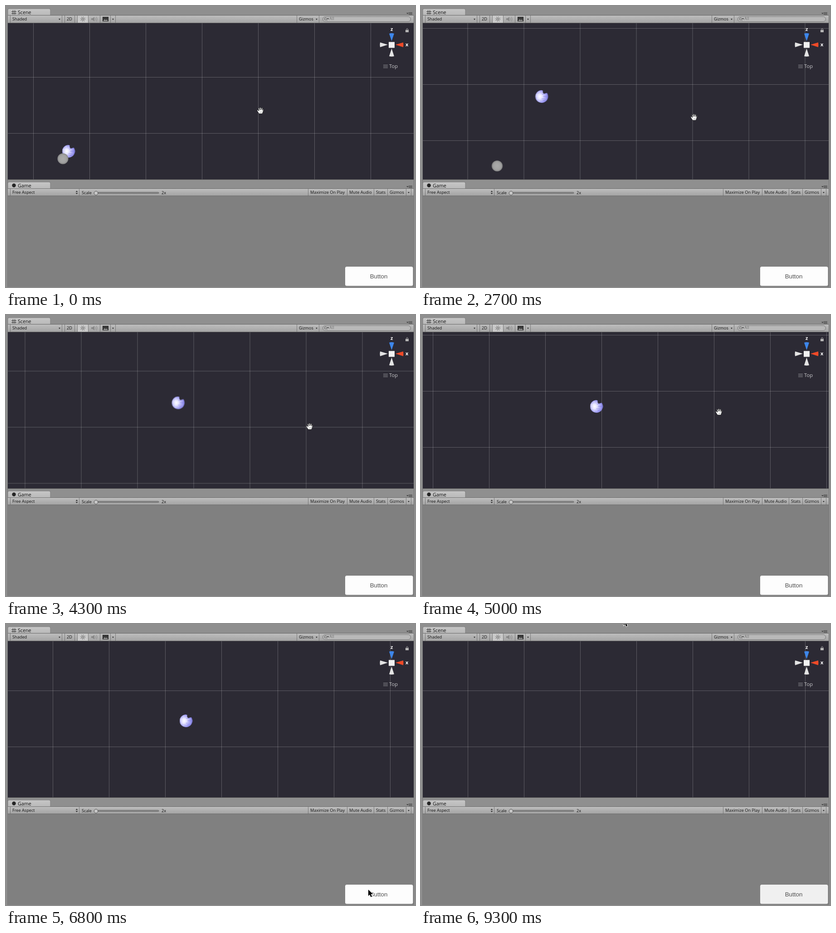
An HTML page for the animation above (9500 ms loop, 902x621 px).

```html
<!DOCTYPE html>
<html lang="en">
<head>
<meta charset="utf-8">
<title>Scene and game panels</title>
<style>
html, body { margin: 0; width: 100%; height: 100%; overflow: hidden; background: #8f8f8f; }
svg { display: block; width: 902px; height: 621px; }
text { font: 9.2px "Open Sans", "Noto Sans", sans-serif; fill: #111; }
.tab { font-size: 10.7px; }
.light { font-size: 11.2px; fill: #c8c8cb; }
.axis { font: bold 11px "Open Sans", sans-serif; fill: #fff; }
.label { font: 13.4px "Liberation Sans", Arial, sans-serif; fill: #505050; text-anchor: middle; }
.line { fill: none; stroke: #555; }

#pan, #ball, #hand, #arrow, #handShow, #arrowShow, .play, .idle, #ballShow, #face {
  animation: 9.5s step-end infinite;
}
#pan { animation-name: pan; }
#ball { animation-name: ball; }
#hand { animation-name: hand; }
#arrow { animation-name: arrow; }
#handShow { animation-name: handShow; }
#arrowShow { animation-name: arrowShow; }
#ballShow { animation-name: ballShow; }
#face { animation-name: face; }
.play { animation-name: play; }
.idle { animation-name: idle; }

/* Motion advances ten times a second. */
@keyframes pan {
  0% { transform: translate(0, 0); }
  10.526% { transform: translate(0, 0); animation-timing-function: steps(8); }
  18.947% { transform: translate(-36px, -14px); animation-timing-function: steps(18); }
  37.894% { transform: translate(121px, 46px); animation-timing-function: steps(14); }
  52.631% { transform: translate(90px, 135px); animation-timing-function: steps(11); }
  64.21%, 100% { transform: translate(43px, 238px); }
}
@keyframes ball {
  0% { transform: translate(136.5px, 321px); animation-timing-function: steps(18); }
  18.947% { transform: translate(194.5px, 228px); animation-timing-function: steps(18); }
  37.894% { transform: translate(250px, 140px); animation-timing-function: steps(14); }
  52.631% { transform: translate(295.5px, 67px); animation-timing-function: steps(18); }
  71.578% { transform: translate(352.5px, -24px); animation-timing-function: steps(10); }
  82.105% { transform: translate(386.5px, -79px); animation-timing-function: steps(2); }
  84.21% { transform: translate(391px, -86px); animation-timing-function: steps(3); }
  87.368%, 100% { transform: translate(401px, -102px); }
}
@keyframes hand {
  0% { transform: translate(561px, 231px); animation-timing-function: steps(10); }
  10.526% { transform: translate(558px, 227px); animation-timing-function: steps(8); }
  18.947% { transform: translate(522px, 213px); animation-timing-function: steps(18); }
  37.894% { transform: translate(682px, 278px); animation-timing-function: steps(14); }
  52.631% { transform: translate(657px, 214px); animation-timing-function: steps(11); }
  64.21%, 100% { transform: translate(610px, 317px); }
}
@keyframes arrow {
  0% { transform: translate(610px, 317px); }
  64.21% { transform: translate(610px, 317px); animation-timing-function: steps(6); }
  70.526% { transform: translate(799px, 587px); }
  91.578% { transform: translate(799px, 587px); animation-timing-function: steps(3); }
  94.736% { transform: translate(445px, 5px); }
  95.789% { transform: translate(445px, 5px); animation-timing-function: steps(2); }
  97.894%, 100% { transform: translate(447px, -11px); }
}
@keyframes handShow { 0% { opacity: 1; } 64.21%, 100% { opacity: 0; } }
@keyframes arrowShow { 0% { opacity: 0; } 64.21%, 100% { opacity: 1; } }
@keyframes ballShow { 0% { opacity: 1; } 93.684%, 100% { opacity: 0; } }
@keyframes play { 0% { opacity: 0; } 73.684% { opacity: 1; } 93.684%, 100% { opacity: 0; } }
@keyframes idle { 0% { opacity: 1; } 73.684% { opacity: 0; } 93.684%, 100% { opacity: 1; } }
@keyframes face { 0% { fill: #fdfdfd; } 74.736%, 100% { fill: #f0f0f0; } }
</style>
</head>
<body>
<svg viewBox="0 0 902 621">
  <defs>
    <linearGradient id="bar" x2="0" y2="1">
      <stop stop-color="#bdbdbd"/><stop offset="1" stop-color="#a4a4a4"/>
    </linearGradient>
    <linearGradient id="tab" x2="0" y2="1">
      <stop stop-color="#c6c6c6"/><stop offset="1" stop-color="#b9b9b9"/>
    </linearGradient>
    <radialGradient id="grey">
      <stop stop-color="#aaa"/><stop offset=".7" stop-color="#a2a2a2"/><stop offset="1" stop-color="#858585"/>
    </radialGradient>
    <radialGradient id="blue" cx=".36" cy=".5" r=".66">
      <stop stop-color="#fff"/><stop offset=".3" stop-color="#e2e1ff"/>
      <stop offset=".65" stop-color="#aaa8f6"/><stop offset="1" stop-color="#7c79e0"/>
    </radialGradient>
    <pattern id="grid" x="60" y="157" width="124" height="124" patternUnits="userSpaceOnUse">
      <path d="M.5 0V124M0 .5H124" stroke="#fff" stroke-opacity=".24"/>
    </pattern>
    <clipPath id="view"><rect x="4" y="38" width="895" height="345"/></clipPath>
    <g id="menu">
      <path d="M883 15h5l-2.5 3z" fill="#444"/>
      <path d="M888 14.5h8M888 16.5h8M888 18.5h8" stroke="#444"/>
    </g>
    <path id="drop" d="M0 0h4l-2 3z" fill="#333"/>
  </defs>

  <rect width="902" height="621" fill="#8f8f8f"/>
  <path d="M3.5 21V621M899.5 21V621" stroke="#777"/>

  <!-- Scene panel -->
  <path d="M4 21V9q0-3 3-3H95q3 0 3 3V21z" fill="url(#tab)" stroke="#808080"/>
  <path d="M12 12.5h11M12 16.5h11M15.5 9v10M19.5 9v10" stroke="#333"/>
  <text class="tab" x="26" y="18">Scene</text>
  <use href="#menu"/>
  <rect x="4" y="21" width="895" height="16" fill="url(#bar)"/>
  <path class="line" d="M4 20.5H899M4 37.5H899" stroke-opacity=".7"/>
  <path class="line" d="M9.5 21V37M123.5 21V37M129.5 21V37M151.5 21V37M157.5 21V37M181.5 21V37M207.5 21V37M230.5 21V37M241.5 21V37M641.5 21V37M690.5 21V37" stroke-opacity=".6"/>
  <rect x="158" y="21" width="23" height="16" fill="#c9c9c9"/>
  <text x="14" y="32">Shaded</text><use href="#drop" x="116" y="28"/>
  <text x="134" y="32">2D</text>
  <circle cx="169.5" cy="29" r="2.3" fill="none" stroke="#444"/>
  <circle cx="169.5" cy="29" r="4.8" fill="none" stroke="#555" stroke-width="1.3" stroke-dasharray="1.2 2.57"/>
  <path d="M188 27h3l4-3v10l-4-3h-3z" fill="#888"/>
  <path d="M197 26q2 3 0 6M199 24q4 5 0 10" fill="none" stroke="#888"/>
  <rect x="213.5" y="24.500" width="12" height="9" fill="#3a3a3a" stroke="#222"/>
  <path d="M214 33l3.500-3.500 2.500 2 2-1.500 3 3z" fill="#a0a0a0"/>
  <use href="#drop" x="234" y="28"/>
  <text x="646" y="32">Gizmos</text><use href="#drop" x="683" y="28"/>
  <rect x="698.5" y="23.5" width="194" height="11" rx="5.5" fill="#b9b9b9" stroke="#777"/>
  <circle cx="704.5" cy="28.5" r="2.5" fill="none" stroke="#555"/>
  <path d="M706.5 30.5l2 2" stroke="#555"/><use href="#drop" x="708" y="27"/>
  <text x="713" y="31" style="fill:#777">All</text>

  <rect x="4" y="38" width="895" height="345" fill="#2c2a34"/>
  <g clip-path="url(#view)">
    <g id="pan">
      <rect x="-250" y="-300" width="1300" height="800" fill="url(#grid)"/>
      <g id="ballShow"><g id="ball">
        <path d="M1-14A14 14 0 1 0 13-8L6-6 4-9 4-13z" fill="url(#blue)"/>
        <g class="idle" fill="none">
          <path d="M-12-4H12M-11 5H11M-4-12V12" stroke="#fff" stroke-opacity=".4"/>
          <path d="M2-5h9M5 0h8M1 5h9M4 9h5M-11 2v4" stroke="#7774dd" stroke-opacity=".65"/>
        </g>
        <g class="play" fill="none">
          <path d="M-8-9l3 6M-10 6l6-2M-3 12l1-7M5 10L2 4" stroke="#6662d6" stroke-opacity=".75" stroke-width="1.5"/>
          <path d="M4-6l9-1M4-1h10M3 4l9 2" stroke="#908cf2" stroke-width="2"/>
          <path d="M8-3.500h6M8 1.500h6" stroke="#3b3868" stroke-width="1.500"/>
        </g>
      </g></g>
      <circle cx="125.5" cy="337.5" r="12" fill="url(#grey)"/>
    </g>
    <!-- Axis gizmo -->
    <path d="M845 61q5.500-2 11 0l-5.500 16.500z" fill="#3d86ea"/>
    <path d="M876 80.500q1 5.500 0 10.500l-17-5.500z" fill="#ee4a28"/>
    <path d="M825 80.500q-1 5.500 0 10.500l17-5.500zM845 111q5.500 1.500 11 0l-5.500-17z" fill="#e4e4e4"/>
    <rect x="844" y="79.5" width="13" height="13" fill="#f2f2f2"/>
    <text class="axis" x="848" y="55">z</text>
    <text class="axis" x="881" y="89">x</text>
    <rect x="881" y="53" width="7" height="5" fill="#b5b5b5"/>
    <path d="M883 53v-2q1.5-3 3.5 0v2" fill="none" stroke="#b5b5b5"/>
    <path d="M832 130.5h10M832 133.5h10M832 136.5h10" stroke="#909095"/>
    <text class="light" x="845" y="137">Top</text>
  </g>
  <path class="line" d="M4 383.5H899"/>

  <!-- Game panel -->
  <path d="M4 404V392q0-3 3-3H95q3 0 3 3V404z" fill="url(#tab)" stroke="#808080"/>
  <circle cx="17.5" cy="396.5" r="4.2" fill="#252525"/>
  <text class="tab" x="26" y="401">Game</text>
  <use href="#menu" y="383"/>
  <rect x="4" y="404" width="895" height="15" fill="url(#bar)"/>
  <path class="line" d="M4 403.5H899M4 419.5H899" stroke-opacity=".6"/>
  <path class="line" d="M9.5 404V419M161.5 404V419M666.5 404V419M752.5 404V419M811.5 404V419M841.5 404V419M882.5 404V419M893.5 404V419" stroke-opacity=".6"/>
  <text x="14" y="415">Free Aspect</text>
  <path d="M153.5 411l2.5-3 2.5 3zM153.5 413l2.5 3 2.5-3z" fill="#333"/>
  <text x="167" y="416">Scale</text>
  <rect x="198" y="411.5" width="139" height="3" rx="1.5" fill="#8b8b8b" stroke="#696969"/>
  <circle cx="198.5" cy="413.5" r="4.3" fill="#c6c6c6" stroke="#505050"/>
  <text x="343" y="416">2x</text>
  <text x="671" y="415">Maximize On Play</text>
  <text x="757" y="415">Mute Audio</text>
  <text x="816" y="415">Stats</text>
  <text x="846" y="415">Gizmos</text>
  <use href="#drop" x="886" y="411"/>

  <rect x="4" y="420" width="895" height="201" fill="#808080"/>
  <g class="play">
    <rect x="4" y="420" width="895" height="200" fill="#a2a2a2"/>
    <path d="M598 420H899V620H595z" fill="#b5b5b5"/>
  </g>
  <rect x="747.5" y="575.5" width="150.5" height="43.5" rx="4" fill="#777" fill-opacity=".3"/>
  <rect id="face" x="748" y="576" width="149.5" height="42.5" rx="3.5" fill="#fdfdfd"/>
  <text class="label" x="822" y="602">Button</text>

  <g id="handShow"><g id="hand">
    <path d="M-3 7L-6.5 1.5Q-8-1-6-1.5L-3 1-4.5-4.5Q-4-6.5-2.5-5L-1-1-1.5-6Q0-8 1-6L1.5-1 2.5-5.5Q4-7 4.5-5L4.5 0 5.5-3Q7-4 7-2L5.5 4 4 7z" fill="#fff" stroke="#111" stroke-width=".8"/>
    <path d="M0 2v3M2 2v3M4 2v2" stroke="#888" stroke-width=".7"/>
  </g></g>
  <g id="arrowShow"><g id="arrow">
    <path d="M0 0V14l3.2-3 2.4 5.4 2.6-1.1-2.4-5.2H10.2z" fill="#000" stroke="#fff" stroke-width="1.8" paint-order="stroke"/>
  </g></g>
</svg>
</body>
</html>
```
